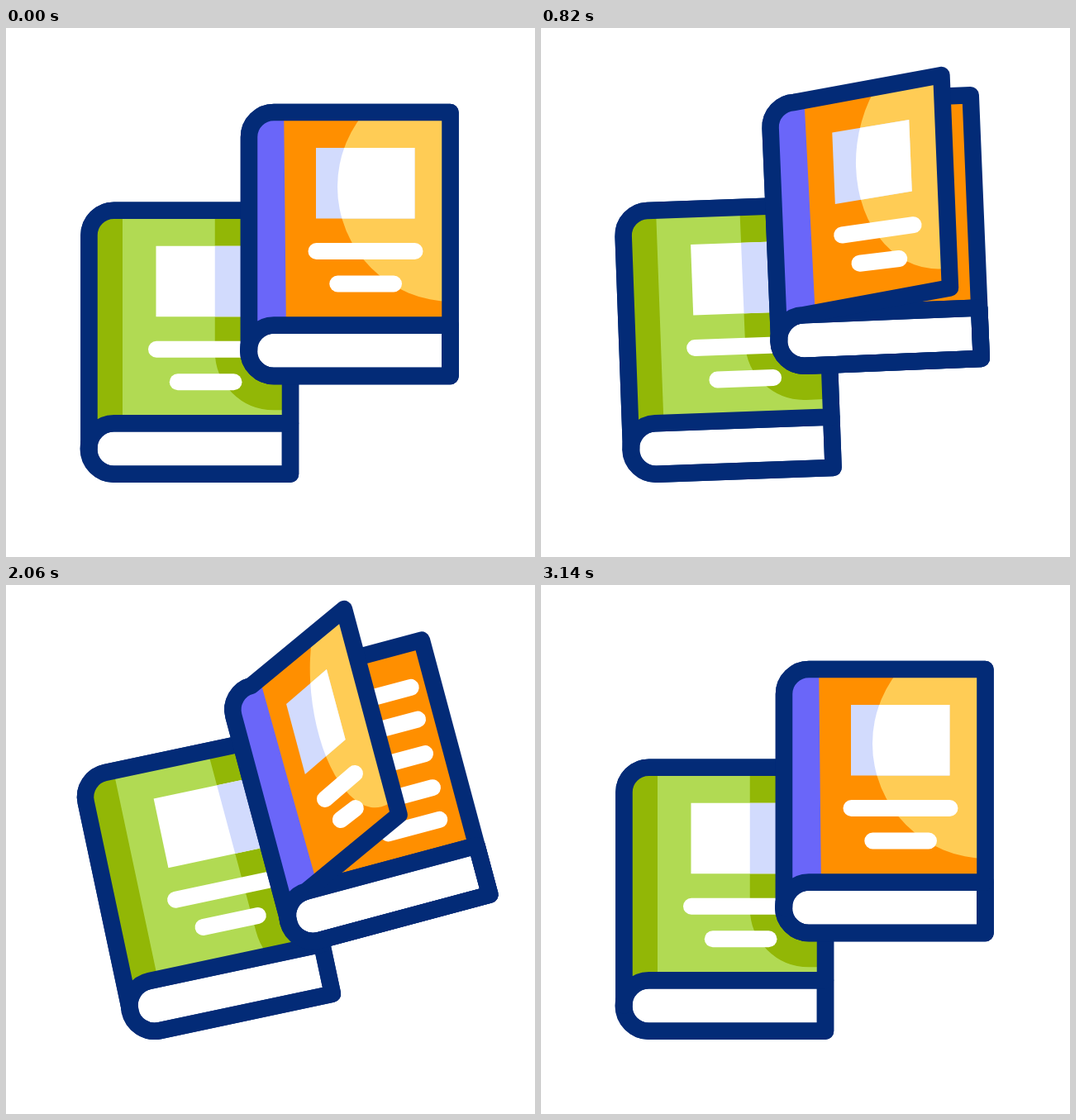
Animation, 640 px wide and 640 px high, one loop 3.56 s. Source, as an HTML page with a canvas:

```html
<!DOCTYPE html>
<html lang="en">
<head>
<meta charset="utf-8">
<title>Two books</title>
<style>
  html, body { margin: 0; width: 100%; height: 100%; overflow: hidden; background: #fff; }
  canvas { display: block; width: 100vw; height: 100vh; }
</style>
</head>
<body>
<canvas id="stage" width="640" height="640"></canvas>
<script>
const LOOP = 3560;
const NAVY = '#032b77', WHITE = '#fff', LAVENDER = '#d2dbfd';
const ORANGE = '#ff8f00', AMBER = '#ffcc55', PURPLE = '#6a66f9';
const LIME = '#b1da53', MOSS = '#92b706';
const ctx = document.getElementById('stage').getContext('2d');

const lerp = (a, b, q) => a + (b - a) * q;
const clamp = x => Math.max(0, Math.min(1, x));
const smooth = x => x * x * (3 - 2 * x);

// Monotone cubic curve through [time, value] keys, at rest at both ends.
function track(...keys) {
  const rate = i => (keys[i + 1][1] - keys[i][1]) / (keys[i + 1][0] - keys[i][0]);
  const slope = keys.map((_, i) => {
    if (i === 0 || i === keys.length - 1) return 0;
    const a = rate(i - 1), b = rate(i);
    return a * b > 0 ? 2 * a * b / (a + b) : 0;
  });
  return t => {
    if (t <= keys[0][0]) return keys[0][1];
    const i = keys.findIndex(k => k[0] > t) - 1;
    if (i < 0) return keys[keys.length - 1][1];
    const [t0, v0] = keys[i], [t1, v1] = keys[i + 1];
    const d = t1 - t0, u = (t - t0) / d, w = 1 - u;
    return v0 + (v1 - v0) * smooth(u) + d * u * w * (w * slope[i] - u * slope[i + 1]);
  };
}

const motion = {
  lean: track([240, 0], [420, 8.5], [520, 12], [640, 8.1], [800, 2], [980, 6], [1220, 12],
    [2540, 12], [2700, 8.9], [3050, 0]),
  turn: track([380, 0], [420, .55], [655, 9.1], [980, -13.9], [1180, -15],
    [2540, -15], [2700, -11.5], [3090, 0]),
  dx: track([380, 0], [420, -.6], [650, -33.2], [980, 9.5], [1180, 10.7],
    [2540, 10.7], [2700, 22], [2810, 36], [3090, 0]),
  dy: track([240, 0], [420, -20], [570, -27], [640, -26], [980, -9.3],
    [2540, -9.4], [2700, -4], [2950, 0]),
  open: track([660, 0], [980, .9], [1200, 1], [2540, 1], [2700, .65], [3150, 0])
};

// Both books share one set of local coordinates.
const HINGE = 324, LEFT = 294, RIGHT = 537.5, TOP = 102, SHELF = 359.5, BOTTOM = 421;

function place(x, y, degrees, pivotX, pivotY) {
  ctx.setTransform(1, 0, 0, 1, x, y);
  ctx.rotate(degrees * Math.PI / 180);
  ctx.translate(-pivotX, -pivotY);
}

function clipped(path, draw) {
  ctx.save();
  ctx.clip(path);
  draw();
  ctx.restore();
}

function fill(path, color) {
  ctx.fillStyle = color;
  ctx.fill(path);
}

function stroke(path, color, width = 20.5) {
  ctx.strokeStyle = color;
  ctx.lineWidth = width;
  ctx.lineCap = ctx.lineJoin = 'round';
  ctx.stroke(path);
}

function polygon(points) {
  const p = new Path2D();
  points.forEach(([x, y]) => p.lineTo(x, y));
  p.closePath();
  return p;
}

function bar(x0, y0, x1, y1) {
  const p = new Path2D();
  p.moveTo(x0, y0);
  p.lineTo(x1, y1);
  stroke(p, WHITE, 20);
}

const body = new Path2D(
  `M${RIGHT} ${TOP}H${HINGE}A30 30 0 0 0 ${LEFT} 132V391A30 30 0 0 0 ${HINGE} ${BOTTOM}H${RIGHT}Z`);
const pages = new Path2D(
  `M${RIGHT} ${SHELF}H${HINGE}A30.75 30.75 0 0 0 ${HINGE} ${BOTTOM}H${RIGHT}Z`);

// Front cover: its free edge slides inwards and up as it opens.
function coverPath(q) {
  const x = lerp(RIGHT, 456.5, q), rise = 60.5 * q;
  return new Path2D(`M${x} ${TOP - rise}L${HINGE} ${TOP}A30 30 0 0 0 ${LEFT} 132V390` +
    `A30 30 0 0 1 ${HINGE} ${SHELF}L${x} ${SHELF - rise}Z`);
}

function picturePath(q) {
  const x0 = lerp(375, 359.3, q), x1 = lerp(494.5, 417.3, q);
  const y0 = lerp(145, 134.4, q), y1 = lerp(145, 106.5, q), h = lerp(85.5, 88, q);
  return polygon([[x0, y0], [x1, y1], [x1, y1 + h], [x0, y0 + h]]);
}

function titleBars(q) {
  bar(lerp(375.5, 374.8, q), lerp(270, 257.7, q), lerp(494.5, 417.6, q), lerp(270, 237, q));
  bar(lerp(401.3, 386.6, q), lerp(309.5, 286.7, q), lerp(469, 407.6, q), lerp(309.5, 277.9, q));
}

function drawBase(color) {
  fill(body, color);
  fill(pages, WHITE);
  stroke(body, NAVY);
  stroke(pages, NAVY);
}

function drawFront(q, colors, spine, paintTone) {
  const cover = coverPath(q), picture = picturePath(q);
  clipped(cover, () => {
    fill(cover, colors.face);
    paintTone(colors.tone);
    fill(polygon([[LEFT, 60], [spine[0], 60], [spine[0], 112], [spine[1], 349],
      [spine[1], BOTTOM], [LEFT, BOTTOM]]), colors.spine);
    fill(picture, colors.picture);
    clipped(picture, () => paintTone(colors.pictureTone));
    titleBars(q);
  });
  stroke(cover, NAVY);
}

function drawText(t) {
  [154, 193.5, 236, 278, 317.5].forEach((y, i) => {
    const grow = smooth(clamp((t - 1500 - i * 105) / 140));
    if (grow > 0) bar(438, y, lerp(438, 510 - i * 2, grow), y);
  });
}

function render(t) {
  const lean = motion.lean(t), q = motion.open(t);
  const placeFront = () =>
    place(415.75 + motion.dx(t), 261.25 + motion.dy(t), motion.turn(t), 415.75, 261.25);
  const placeRear = () => place(130.5 + 4.1 * lean, 508.8, -lean, HINGE, 390);

  ctx.setTransform(1, 0, 0, 1, 0, 0);
  ctx.fillStyle = WHITE;
  ctx.fillRect(0, 0, 640, 640);

  placeRear();
  drawBase(LIME);
  drawFront(0,
    { face: LIME, tone: MOSS, spine: MOSS, picture: WHITE, pictureTone: LAVENDER },
    [334.5, 334.5],
    color => {
      // Shadow cast by the front book: its outline, widened.
      ctx.save();
      placeFront();
      fill(body, color);
      stroke(body, color, 82.5);
      ctx.restore();
    });

  placeFront();
  drawBase(ORANGE);
  drawText(t);
  stroke(pages, NAVY);
  drawFront(q,
    { face: ORANGE, tone: AMBER, spine: PURPLE, picture: LAVENDER, pictureTone: WHITE },
    [336.3, 338.8],
    color => {
      ctx.save();
      ctx.transform(lerp(1, .49, q), -.2 * q, -.03 * q, 1, 197 * q, 58.6 * q);
      const glow = new Path2D();
      glow.arc(540, 192, 139, 0, 2 * Math.PI);
      fill(glow, color);
      ctx.restore();
    });
}

function tick() {
  render(performance.now() % LOOP);
  requestAnimationFrame(tick);
}
tick();
</script>
</body>
</html>
```
